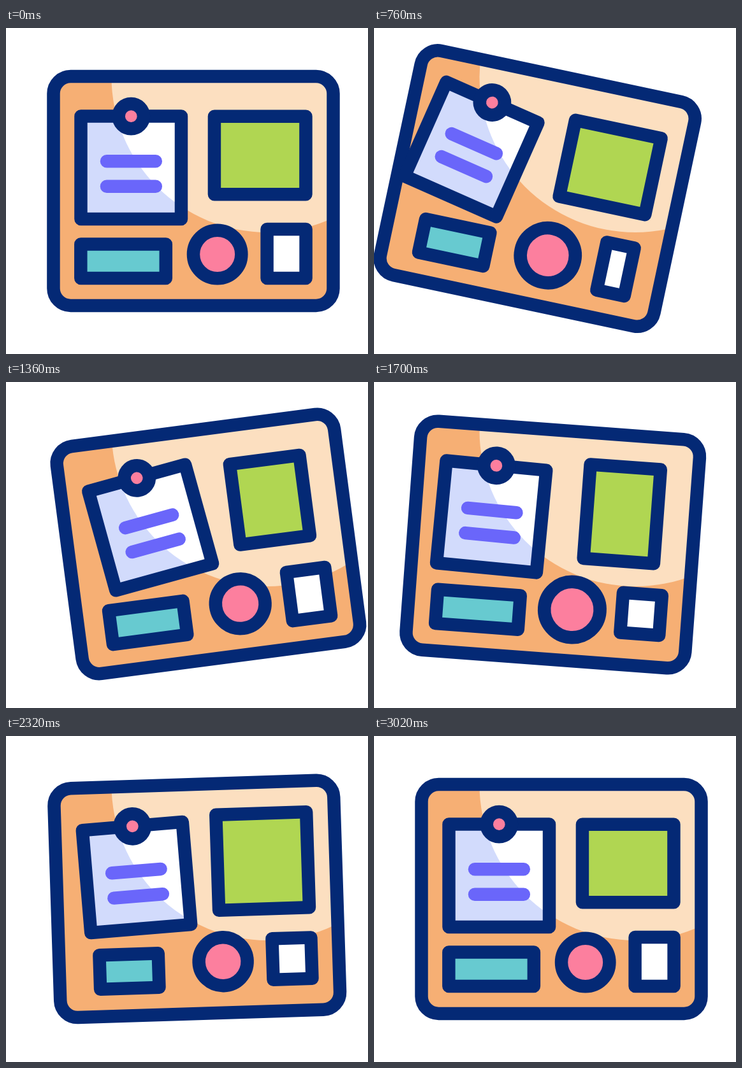
Animation, 568 px wide and 512 px high, one loop 3.22 s. Source, as an HTML page with a canvas:

```html
<!DOCTYPE html>
<html lang="en">
<head>
<meta charset="utf-8">
<title>Pin board</title>
<style>
  html, body { margin: 0; width: 100%; height: 100%; overflow: hidden; background: #fff; }
  canvas { display: block; }
</style>
</head>
<body>
<canvas id="stage" width="568" height="512"></canvas>
<script>
const LOOP = 3220, PIVOT = [294, 76], PIN = [196.3, 138.7], LAG = 100;
const NAVY = '#042975', ORANGE = '#f6af74', BEIGE = '#fcdfc0', LAVENDER = '#d2dbfc',
      PURPLE = '#6a66fa', PINK = '#fc7f9e', GREEN = '#b0d652', TEAL = '#67cad0';
const ctx = document.getElementById('stage').getContext('2d');

function bezier(x1, y1, x2, y2) {
  const at = (a, b, s) => 3 * (1 - s) * (1 - s) * s * a + 3 * (1 - s) * s * s * b + s * s * s;
  return u => {
    let lo = 0, hi = 1;
    for (let i = 0; i < 24; i++) {
      const mid = (lo + hi) / 2;
      if (at(x1, x2, mid) < u) lo = mid; else hi = mid;
    }
    return at(y1, y2, lo);
  };
}
const ease = bezier(.25, .1, .25, 1);
const easeInOut = bezier(.42, 0, .58, 1);
const smooth = u => u * u * (3 - 2 * u);

// Keys are [time, value, easing into this key]
function track(keys, t, fallback) {
  if (t <= keys[0][0]) return keys[0][1];
  for (let i = 1; i < keys.length; i++) {
    const [t0, v0] = keys[i - 1], [t1, v1, curve = fallback] = keys[i];
    if (t < t1) return v0 + (v1 - v0) * curve((t - t0) / (t1 - t0));
  }
  return keys[keys.length - 1][1];
}

const SWING = [[0, 0], [750, 12, ease], [785, 12], [1250, -8], [1290, -8],
               [1785, 5], [2190, -3], [2540, 1], [2730, 0]];
const swing = t => track(SWING, t, easeInOut) * Math.PI / 180;

// Values change one after another, each step lasting 600 ms
const steps = (start, ...values) => {
  const keys = values.map((v, i) => [start + i * 600, v]);
  return t => track(keys, t, smooth);
};
const greenW = steps(600, 143.5, 110.5, 110.5, 143.5);
const greenH = steps(1200, 122.5, 150, 150, 122.5);
const tealW = steps(400, 133.5, 87.5, 133.5, 87.5, 133.5);
const whiteW = steps(200, 61, 44, 61);
const whiteH = steps(1400, 77, 49, 77);
const discR = steps(0, 37.7, 44.2, 37.7, 44.2, 37.7);

function turn([x, y], angle) {
  ctx.translate(x, y);
  ctx.rotate(angle);
  ctx.translate(-x, -y);
}

function paint(path, fill) {
  ctx.fillStyle = fill;
  ctx.fill(path);
  ctx.strokeStyle = NAVY;
  ctx.stroke(path);
}

function box(cx, cy, w, h, fill) {
  const path = new Path2D();
  path.rect(cx - w / 2, cy - h / 2, w, h);
  paint(path, fill);
}

function disc([x, y], r, fill) {
  const path = new Path2D();
  path.arc(x, y, r, 0, 7);
  paint(path, fill);
}

// A panel lit by a round light that stays still on the stage
function litPanel(path, shade, light) {
  ctx.fillStyle = shade;
  ctx.fill(path);
  ctx.save();
  ctx.clip(path);
  ctx.resetTransform();
  ctx.fillStyle = light;
  ctx.beginPath();
  ctx.arc(410, 76.5, 244.5, 0, 7);
  ctx.fill();
  ctx.restore();
  ctx.strokeStyle = NAVY;
  ctx.stroke(path);
}

function drawPaper(t) {
  ctx.save();
  turn(PIN, swing(t - LAG));
  const sheet = new Path2D();
  sheet.rect(117.5, 138.5, 157.5, 161.5);
  litPanel(sheet, LAVENDER, '#fff');
  ctx.strokeStyle = PURPLE;
  for (const y of [209.3, 248.7]) {
    ctx.beginPath();
    ctx.moveTo(158, y);
    ctx.lineTo(234.8, y);
    ctx.stroke();
  }
  ctx.restore();
}

function draw(t) {
  ctx.resetTransform();
  ctx.fillStyle = '#fff';
  ctx.fillRect(0, 0, 568, 512);
  ctx.lineWidth = 20.5;
  ctx.lineJoin = ctx.lineCap = 'round';
  turn(PIVOT, swing(t));

  const board = new Path2D();
  board.roundRect(74.5, 76, 439, 360, 27);
  litPanel(board, ORANGE, BEIGE);

  box(398.7, 199.9, greenW(t), greenH(t), GREEN);
  box(184.1, 366.2, tealW(t), 53.5, TEAL);
  box(440.1, 354.4, whiteW(t), whiteH(t), '#fff');
  disc([331.7, 355.5], discR(t), PINK);
  drawPaper(t);
  disc(PIN, 19.6, PINK);
}

const start = performance.now();
function frame() {
  draw((performance.now() - start) % LOOP);
  requestAnimationFrame(frame);
}
frame();
</script>
</body>
</html>
```
